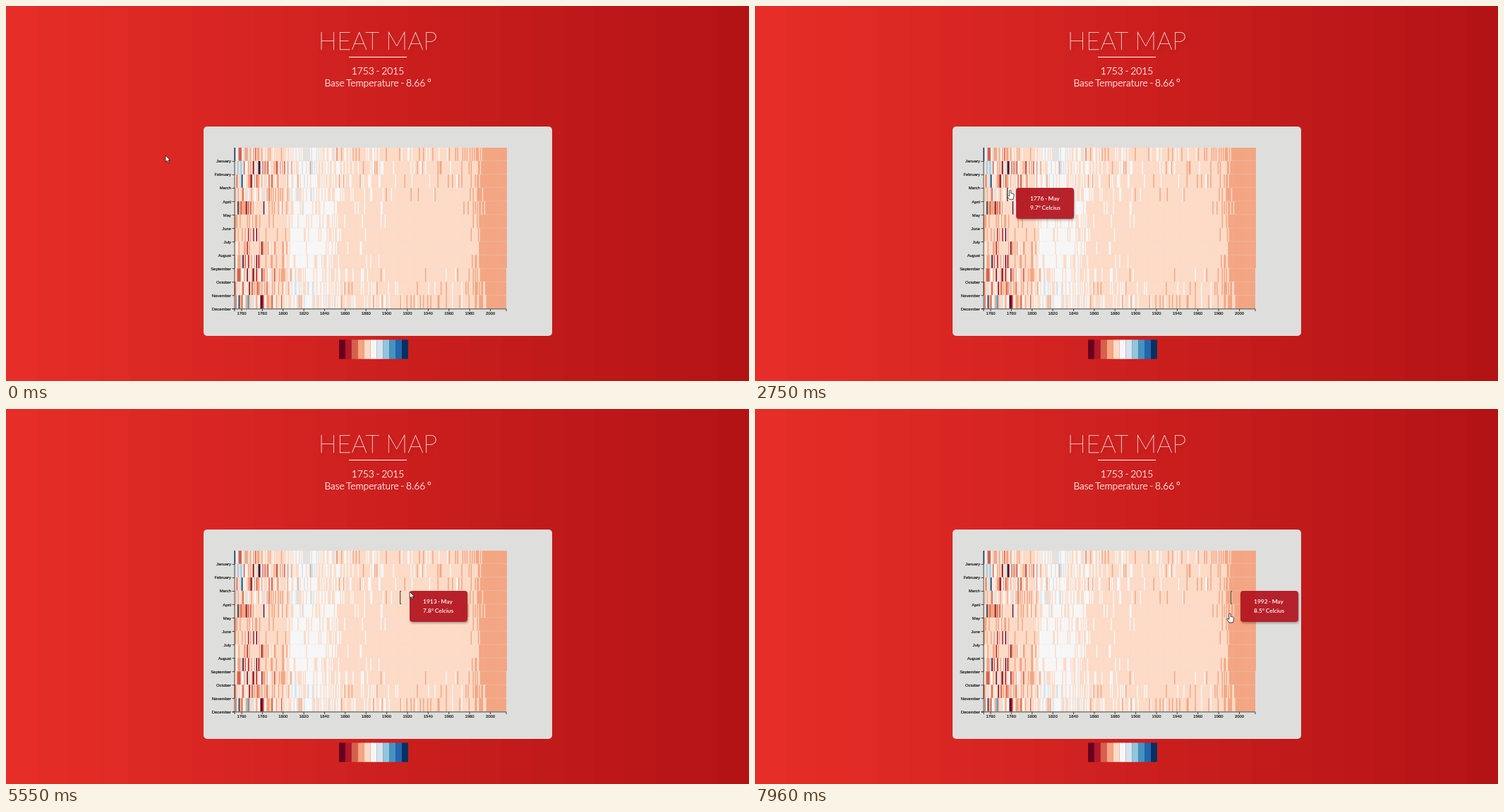
An HTML page with a canvas for the animation above (8000 ms loop, 1053 by 532 pixels).

```html
<!DOCTYPE html>
<html lang="en">
<head>
<meta charset="utf-8">
<title>Heat Map</title>
<style>
  html, body { margin: 0; width: 100%; height: 100%; overflow: hidden; }
  #stage { position: relative; width: 1053px; height: 532px; overflow: hidden; color: #fff; font-family: Lato, sans-serif; }
  #stage > * { position: absolute; }
  canvas, svg { left: 0; top: 0; width: 1053px; height: 532px; }
  h1, p { margin: 0; left: 0; width: 1054px; text-align: center; white-space: nowrap; -webkit-text-stroke: .25px #fff; }
  h1 { top: 25.5px; font-size: 35px; line-height: 44px; font-weight: 100; text-shadow: 2px 3px 4px rgba(0,0,0,.35); }
  hr { left: 486px; top: 72px; width: 82px; height: 1.2px; margin: 0; border: 0; background: #fff; }
  p { top: 83px; font-size: 13.8px; line-height: 17px; font-weight: 300; word-spacing: -1.1px; }
  #card { left: 279.6px; top: 170.6px; width: 494.8px; height: 297.2px; border-radius: 5px; background: #dededd; }
  #axes { font: 5.9px "Liberation Sans", Arial, sans-serif; }
  #axes text { stroke: #000; stroke-width: .12px; }
  #tip { box-sizing: border-box; height: 44px; padding: 9.5px 19.5px; border-radius: 4px; white-space: pre;
    font-size: 8.4px; line-height: 12.5px; font-weight: 600; word-spacing: -.6px;
    background: rgba(178,18,28,.92); box-shadow: 1px 2px 3px rgba(0,0,0,.3); }
</style>
</head>
<body>
<div id="stage">
  <h1>HEAT MAP</h1>
  <hr>
  <p>1753 - 2015<br>Base Temperature - 8.66 °</p>
  <div id="card"></div>
  <canvas id="heat" width="1053" height="532"></canvas>
  <svg id="axes" viewBox="0 0 1053 532">
    <path id="lines" fill="none" stroke="#000" stroke-width=".7"/>
    <path id="mark" fill="none" stroke="#222" stroke-width=".9"/>
  </svg>
  <div id="tip"></div>
  <svg viewBox="0 0 1053 532">
    <g id="cursor" fill="#fff" stroke="#000" stroke-width=".7" stroke-linejoin="round">
      <path id="arrow" d="M0 0V9.2L2.2 7.3 3.7 10.6 5.2 9.9 3.8 6.8H6.6Z"/>
      <path id="hand" d="M-1.2 1.2Q-1.2 0 0 0T1.2 1.2V4.4L4.6 5.2Q5.8 5.6 5.7 7L5 10.5 4.3 13H-1.2L-4 8.6Q-4.6 7.2-3.2 7.2L-1.2 8.6Z"/>
    </g>
  </svg>
</div>
<script>
const $ = id => document.getElementById(id);
const LOOP = 8000, LAST_STEP = 7960, LAG = 50;
const X0 = 323.7, Y0 = 201, YEAR_W = 1.4687, ROW_H = 19.03, FIRST = 1753, LAST = 2015;
const MONTHS = 'January February March April May June July August September October November December'.split(' ');
const COLORS = '#67001f #b2182b #d6604d #f4a582 #fddbc7 #f7f7f7 #d1e5f0 #92c5de #4393c3 #2166ac #053061'.split(' ');
const yearX = y => X0 + (y - FIRST) * YEAR_W;
const rowY = r => Y0 + r * ROW_H;
const clamp = (v, lo, hi) => Math.min(hi, Math.max(lo, v));
const ramp = (a, b, v) => clamp((v - a) / (b - a), 0, 1);

function random(seed) {
  return () => {
    seed = seed + 0x6D2B79F5 | 0;
    let t = Math.imul(seed ^ seed >>> 15, 1 | seed);
    t = t + Math.imul(t ^ t >>> 7, 61 | t) ^ t;
    return ((t ^ t >>> 14) >>> 0) / 4294967296;
  };
}

// Average colour step and its spread: noisy early records, a cool spell, then steady warming
const mean = y => 3.8 + ramp(1800, 1809, y) - .6 * ramp(1828, 1864, y)
  - .28 * ramp(1895, 1930, y) - .3 * ramp(1965, 1988, y) - .6 * ramp(1986, 1999, y);
const spread = y => .3 + Math.exp((FIRST - y) / 50) - .15 * ramp(1980, 2000, y);
const season = r => .85 + .4 * Math.cos(r / 6 * Math.PI);

function drawHeat() {
  const c = $('heat').getContext('2d'), rnd = random(1753);
  for (let r = 0; r < 12; r++) {
    for (let y = FIRST; y <= LAST - (r > 8); y++) {
      const noise = (rnd() + rnd() + rnd() - 1.5) * 2;
      let step = clamp(Math.round(mean(y) + noise * spread(y) * season(r)), 2, 7);
      // Early extremes: mostly cold in winter, hot in summer
      if (y < 1782 && rnd() < .1) step = rnd() < season(r) - .5 ? 7 + Math.floor(rnd() * 4) : Math.floor(rnd() * 2);
      c.fillStyle = COLORS[step];
      c.fillRect(yearX(y), rowY(r), YEAR_W + (y < LAST ? .5 : 0), ROW_H - .4);
    }
  }
  COLORS.forEach((color, i) => {
    c.fillStyle = color;
    c.fillRect(472 + i * 8.9, 473.5, 8.9, 27.3);
  });
}

function drawAxes() {
  let d = 'M324 201V429.8H320.5M324 433V429.8H709V433';
  const label = (text, x, y, anchor) => {
    const t = document.createElementNS('http://www.w3.org/2000/svg', 'text');
    t.setAttribute('x', x);
    t.setAttribute('y', y);
    t.setAttribute('text-anchor', anchor);
    t.textContent = text;
    $('axes').append(t);
  };
  MONTHS.forEach((m, i) => {
    const y = rowY(i + 1) + .4;
    d += `M320.5 ${y}H324`;
    label(m, 319, y + 2, 'end');
  });
  for (let y = 1760; y <= 2000; y += 20) {
    d += `M${yearX(y)} 429.8V433`;
    label(y, yearX(y), 438.3, 'middle');
  }
  $('lines').setAttribute('d', d);
}

function paintBackground() {
  const n = 24, stops = [];
  for (let i = 0; i < n; i++) {
    const f = (i + .5) / n, mix = (a, b) => Math.round(a + (b - a) * f);
    stops.push(`rgb(${mix(231, 179)},${mix(46, 18)},${mix(39, 22)}) ${i / n * 100}% ${(i + 1) / n * 100}%`);
  }
  $('stage').style.background = `linear-gradient(90deg,${stops})`;
}

const linear = f => f;
const easeIn = power => f => f ** power;
const easeOut = f => 1 - (1 - f) ** 2;
// Pointer moves: start, end, x, y, easing
const MOVES = [
  [580, 1370, 276, 254, linear],
  [1410, 2200, 335, 249, linear],
  [2240, 3030, 376, 268, linear],
  [3060, 3820, 414, 290, linear],
  [4510, 5310, 515, 270, easeIn(1.6)],
  [5340, 5550, 572, 259, linear],
  [5550, 6130, 636, 341, linear],
  [6170, 6510, 692.3, 276, easeOut],
  [6510, 6680, 687, 268, linear],
  [7000, 7480, 676, 270, linear],
  [7750, 7960, 673, 290, easeIn(4)]
];

function pointer(t) {
  let x = 226, y = 212;
  for (const [from, to, toX, toY, ease] of MOVES) {
    const f = ease(ramp(from, to, t));
    x += (toX - x) * f;
    y += (toY - y) * f;
  }
  return [x, y];
}

const READINGS = { '1776 - May': 9.7, '1817 - June': 10.6, '1912 - May': 8.8, '2003 - June': 7.9, '1992 - May': 8.5 };

function render(t) {
  const [x, y] = pointer(t), [hx, hy] = pointer(t - LAG);
  const hand = t >= 1850 && t < 3930 || t >= 7750;
  $('cursor').setAttribute('transform', `translate(${x} ${y})`);
  $('hand').style.display = hand ? '' : 'none';
  $('arrow').style.display = hand ? 'none' : '';

  const over = hx >= X0;
  $('tip').style.display = $('mark').style.display = over ? '' : 'none';
  if (!over) return;
  const year = FIRST + Math.floor((hx - X0) / YEAR_W), row = Math.floor((hy - Y0) / ROW_H);
  const cx = yearX(year), cy = rowY(row), name = `${year} - ${MONTHS[row + 1]}`;
  const temp = READINGS[name] || 8.66 + Math.sin(year * 7 + row) * .9;
  $('mark').setAttribute('d', `M${cx + YEAR_W} ${cy + .3}H${cx}V${cy + ROW_H - .8}h${YEAR_W}`);
  $('tip').textContent = `${name}\n${temp.toFixed(1)}° Celcius`;
  $('tip').style.left = cx + 12.9 + 'px';
  $('tip').style.top = cy - .1 + 'px';
}

paintBackground();
drawHeat();
drawAxes();
const start = performance.now();
(function tick() {
  render(Math.min((performance.now() - start) % LOOP, LAST_STEP));
  requestAnimationFrame(tick);
})();
</script>
</body>
</html>
```
